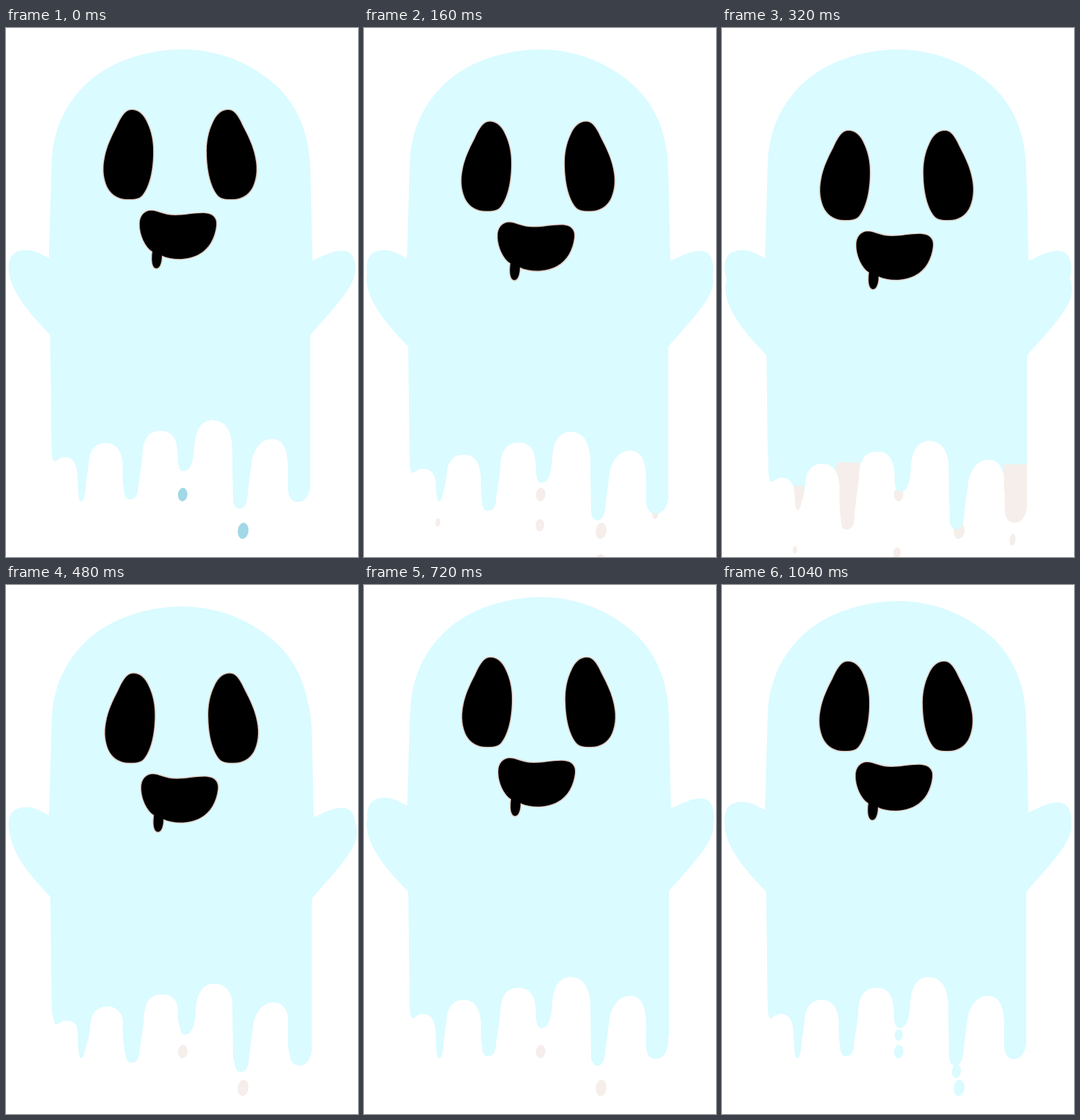
Animation of 524 by 788 pixels, one loop 1.12 s. Source, as an HTML page with a canvas:

```html
<!DOCTYPE html>
<html lang="en">
<head>
<meta charset="utf-8">
<title>Dripping ghost</title>
<style>
  html, body { margin: 0; width: 100%; height: 100%; overflow: hidden; background: #fff; }
  canvas { display: block; }
</style>
</head>
<body>
<canvas width="524" height="788"></canvas>
<script>
const ctx = document.querySelector('canvas').getContext('2d');
const STEP = 80, STEPS = 14;
const BODY = '#dafbff', PALE = '#f5eeea', BLUE = '#a1d8e6';

// Sway of the ghost: [step, dx, dy]
const SWAY = [[0, 0, 0], [2, 0, 17.6], [4, 1, 31], [7, 3, -1], [11, -1, -27], [13, 0, -8], [14, 0, 0]];

// Falling drops: x and y at step 0, radii, first step in which they show
const DROPS = [[263, 695, 7, 10, -1], [353, 749, 8, 12, -1], [111, 691, 4, 7, 1], [435, 676, 5.5, 11, 1]];

// Legs that pale briefly: x, y, width, height
const PALE_LEGS = [[170, 647, 34, 110], [420, 650, 36, 110], [104, 682, 18, 40]];

// thin and long are the tip heights of the two left legs
const bodyPath = (thin, long) => new Path2D(`M68 205C69 150 90 112 120 83C155 50 210 32 263 32
  C315 32 365 52 402 86C437 118 453 165 453 215L456 347C475 338 488 331 502 332
  C514 333 520 342 520 360C520 385 485 420 453 457V683C451 697 445 706 434 706
  C424 706 420 697 420 685V650C419 630 414 612 396 612C378 612 367 630 365 650
  C361 680 360 690 359 700C357 711 353 716 348 716C342 716 338 711 338 700L337 625
  C336 600 327 584 307 584C290 584 281 600 280 625C279 645 275 660 264 660
  C258 660 256 652 256 640C256 612 248 600 230 600C212 600 204 612 203 635
  C201 660 197 675 196 ${long - 12}C194 ${long - 3} 190 ${long} 184 ${long}
  C178 ${long} 176 ${long - 7} 176 ${long - 14}C173 670 174 660 174 650
  C172 630 165 618 148 618C132 618 124 630 123 648C121 665 119 673 118 ${thin - 15}
  C116 ${thin - 3} 114 ${thin} 112 ${thin}C108 ${thin} 108 ${thin - 13} 107 ${thin - 25}
  C107 655 104 639 88 639C78 639 76 646 72 645C69 644 69 638 68 630L66 457
  C50 440 4 395 4 357C4 340 12 331 30 331C45 331 55 339 64 343Z`);

const restBody = bodyPath(705, 702);
const eye = new Path2D(`M187 122C197 122 205 129 210 141C216 153 220 170 219 190
  C218 220 211 239 203 249C198 255 190 255 181 255C168 255 158 249 152 239
  C146 228 143 212 147 193C150 177 157 162 165 147C171 134 177 122 187 122Z`);
const mouth = new Path2D(`M216 272C226 272 234 279 252 279C268 279 282 275 297 276
  C309 277 314 284 313 294C311 313 302 329 287 337C271 346 248 346 232 339
  C232 349 229 358 224 358C218 358 216 348 218 333C207 326 199 308 199 292
  C199 280 206 272 216 272Z`);

function swayAt(k) {
  const i = SWAY.findIndex(s => s[0] > k);
  const [k0, x0, y0] = SWAY[i - 1], [k1, x1, y1] = SWAY[i];
  const p = (k - k0) / (k1 - k0);
  return [x0 + (x1 - x0) * p, y0 + (y1 - y0) * p];
}

function shifted(dx, dy, paint) {
  ctx.save();
  ctx.translate(dx, dy);
  paint();
  ctx.restore();
}

function feature(path) {
  ctx.stroke(path);
  ctx.fill(path);
}

function drop(x, y, rx, ry) {
  ctx.beginPath();
  ctx.ellipse(x, y, rx, ry, 0.1, 0, Math.PI * 2);
  ctx.fill();
}

function drawBody(k, dx, dy) {
  // The resting body stays visible behind the swaying one
  const thin = k > 0 && k < 7 ? 687 : 705;
  const long = 702 + Math.max(0, 14 - 7 * Math.abs(k - 4));
  ctx.fillStyle = BODY;
  ctx.fill(restBody);
  shifted(dx, dy, () => ctx.fill(bodyPath(thin, long)));
  if (k === 4) {
    ctx.globalCompositeOperation = 'source-atop';
    ctx.fillStyle = PALE;
    PALE_LEGS.forEach(r => ctx.fillRect(...r));
  }
}

function drawDrops(k) {
  const fallen = k > 11 ? k - STEPS : k;
  const fall = 24 * fallen - 0.6 * fallen ** 2;
  ctx.globalCompositeOperation = 'destination-over';
  ctx.fillStyle = k === 0 ? BLUE : k < 10 ? PALE : BODY;
  DROPS.forEach(([x, y, rx, ry, first], i) => {
    if (i < 2) drop(x, y, rx, ry);
    if (fallen === 0 || fallen < first) return;
    const size = fallen < 0 ? 0.85 : 1 - 0.05 * fallen;
    const drift = fallen < 0 ? -4 * i : -0.6 * fallen;
    drop(x + drift, y + fall, rx * size, ry * size);
  });
  ctx.globalCompositeOperation = 'source-over';
}

function drawFace() {
  ctx.fillStyle = '#000';
  ctx.strokeStyle = '#dcc6be';
  ctx.lineWidth = 3;
  feature(eye);
  feature(mouth);
  ctx.translate(518, 0);
  ctx.scale(-1, 1);
  feature(eye);
}

function draw(now) {
  const k = Math.floor(now / STEP) % STEPS;
  const [dx, dy] = swayAt(k);
  ctx.clearRect(0, 0, 524, 788);
  drawBody(k, dx, dy);
  drawDrops(k);
  shifted(dx, dy, drawFace);
}

const start = performance.now();
function loop() {
  draw(performance.now() - start);
  requestAnimationFrame(loop);
}
loop();
</script>
</body>
</html>
```
